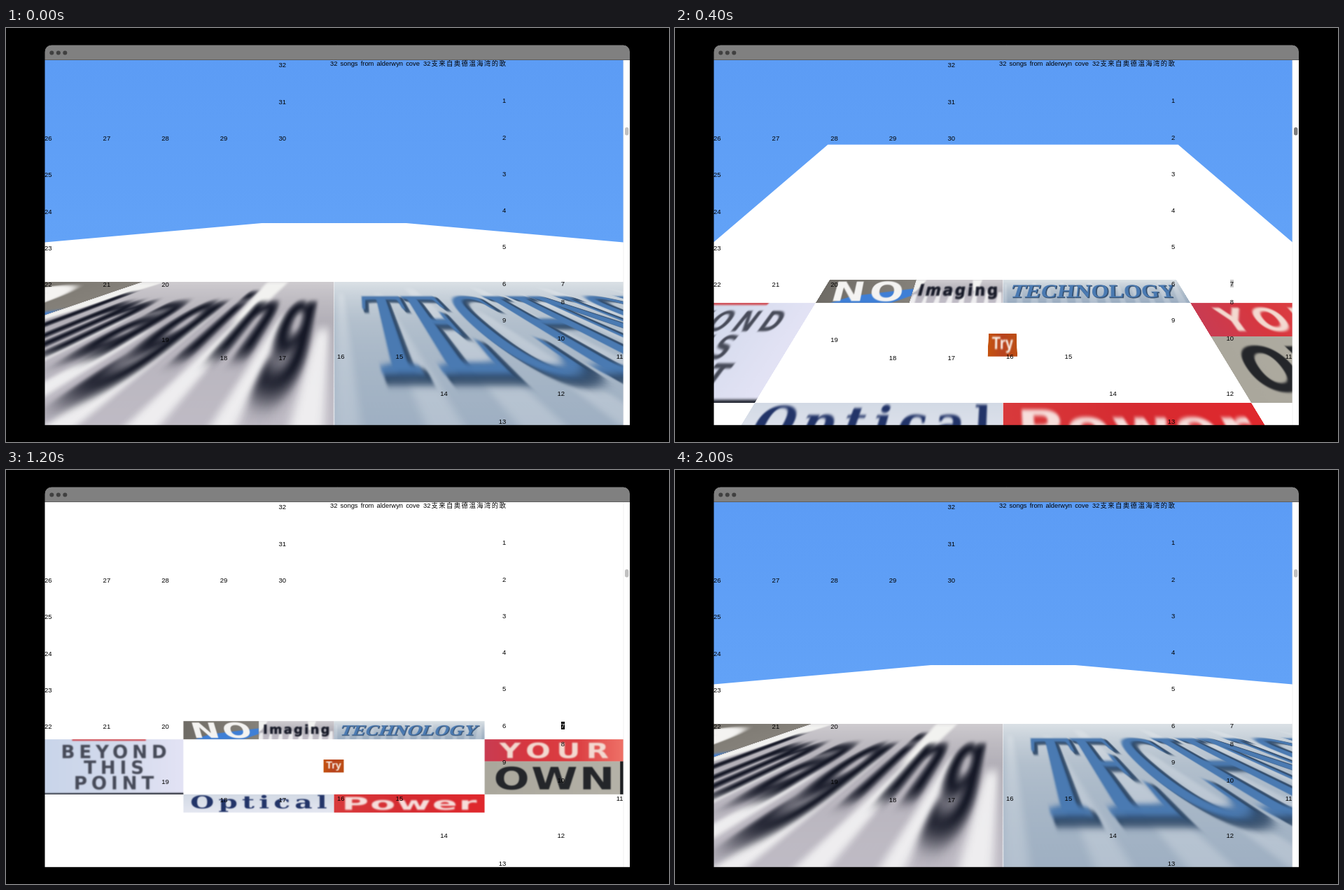
Animation of 947 by 592 pixels, one loop 2.2 s. Source, as an HTML page with a canvas:

```html
<!DOCTYPE html>
<html lang="en">
<head>
<meta charset="utf-8">
<title>Tilting page of signs</title>
<style>
  html, body { margin: 0; width: 100%; height: 100%; overflow: hidden; background: #000; }
  canvas { display: block; }
</style>
</head>
<body>
<canvas id="stage" width="947" height="592"></canvas>
<script>
const ctx = document.getElementById('stage').getContext('2d');
const SANS = '"Liberation Sans", sans-serif';
const HEAVY = '"DejaVu Sans", sans-serif';
const SERIF = '"Liberation Serif", serif';
const SLAB = '"DejaVu Serif", serif';

const view = { x: 55, y: 46, w: 827, h: 522 };
const right = view.x + view.w;
const mid = { x: view.x + view.w / 2, y: 306.5 };
const cell = { w: 83.6, h: 52.3 };   // a tenth of the window

const STEP = 200;
const STEPS = 11;
const tilts = [65, 40.1, 27.6, 0];

// Signs sit on half rows of the grid, in two middle columns with a wing on each side.
const unit = cell.h / 2;
const row = n => 359 + n * unit;
const colW = 215;
const inner = mid.x - colW;
const outer = mid.x + colW;
const wing = inner - view.x;

// The flat strip of signs, painted once at a higher resolution.
const strip = { top: row(0) - 1, h: 5 * unit + 3, k: 5 };
const sheet = document.createElement('canvas');
sheet.width = view.w * strip.k;
sheet.height = strip.h * strip.k;
const art = sheet.getContext('2d');
art.scale(strip.k, strip.k);
art.translate(-view.x, -strip.top);
art.textAlign = 'center';

let seed = 7;
const random = () => (seed = seed * 16807 % 2147483647) / 2147483647;

const soften = px => { art.filter = `blur(${px * strip.k}px)`; };

function shape(color, ...pts) {
  art.fillStyle = color;
  art.beginPath();
  for (let i = 0; i < pts.length; i += 2) art.lineTo(pts[i], pts[i + 1]);
  art.fill();
}

// Text centred by its ink on (x, y).
function letters(text, x, y, { size, ink, face = HEAVY, gap = 0, wide = 1, lean = 0, bold = 0 }) {
  art.save();
  art.transform(wide, 0, -lean, 1, x, y);
  art.font = `bold ${size}px ${face}`;
  art.letterSpacing = gap + 'px';
  art.fillStyle = art.strokeStyle = ink;
  art.lineWidth = bold;
  const box = art.measureText(text);
  const base = (box.actualBoundingBoxAscent - box.actualBoundingBoxDescent) / 2;
  art.fillText(text, gap / 2, base);
  if (bold) art.strokeText(text, gap / 2, base);
  art.restore();
}

// A blurred photo of lettering: a gradient, optional marks, then evenly spaced lines of text.
function sign(x, y, w, h, { colors, down, text, blur = 0.7, marks, shade, ...style }) {
  art.save();
  art.beginPath();
  art.rect(x, y, w, h);
  art.clip();
  const back = art.createLinearGradient(x, y, down ? x : x + w, down ? y + h : y);
  colors.forEach((c, i) => back.addColorStop(i / (colors.length - 1), c));
  art.fillStyle = back;
  art.fillRect(x, y, w, h);
  if (marks) marks(x, y, w, h);
  soften(blur);
  const lines = text.split(' ');
  lines.forEach((line, i) => {
    const cx = x + w / 2;
    const cy = y + h / 2 + (i - (lines.length - 1) / 2) * 22.3;
    if (shade) letters(line, cx + 0.7, cy + 0.5, { ...style, ink: shade, bold: 0.5 });
    letters(line, cx, cy, style);
  });
  art.restore();
}

function streaks(x, y, w, h, gap, color, reach) {
  soften(0.9);
  for (let s = x + 2; s < x + w; s += gap) {
    const tip = y + h * (1 - reach * (0.6 + 0.4 * random()));
    const half = gap * (0.15 + 0.15 * random());
    shape(color, s - half, y + h + 2, s, tip, s + half, tip, s + half, y + h + 2);
  }
}

function paintSigns() {
  sign(inner, row(0), colW / 2, unit, {
    colors: ['#6f6c66', '#7b7770', '#85817a'], text: 'NO', ink: '#f4f3f1',
    size: 30, wide: 1.6, gap: 3, lean: -0.3, blur: 0.5,
    marks(x, y, w, h) {
      soften(0.5);
      shape('#3f7fd6', x + w * 0.15, y + h, x + w * 0.35, y + h * 0.72,
        x + w, y + h * 0.4, x + w, y + h * 0.7, x + w * 0.8, y + h);
    },
  });
  sign(inner + colW / 2, row(0), colW / 2, unit, {
    colors: ['#cfccd0', '#b3b0b8', '#c2bec8'], down: true, text: 'Imaging', ink: '#151826',
    size: 17.5, gap: 2.5, bold: 0.5, blur: 0.75,
    marks(x, y, w, h) {
      streaks(x, y, w, h, 14.3, '#fbfbfbcc', 0.6);
      shape('#f2f2f0', x, y, x + 13, y, x + 4, y + h / 2, x, y + h * 0.6);
      shape('#f2f2f0', x + 70, y, x + 82, y, x + 77, y + h / 2, x + 72, y + h / 2);
    },
  });
  sign(mid.x, row(0), colW, unit, {
    colors: ['#dbe1e6', '#b3c0cd', '#9aacc0'], down: true, text: 'TECHNOLOGY',
    ink: '#4a7ab2', shade: '#2b4564', face: SERIF, size: 21, wide: 1.28, lean: 0.38, blur: 0.35,
    marks: (x, y, w, h) => streaks(x, y, w, h, 17, '#ffffff38', 0.9),
  });
  sign(view.x, row(1), wing, 3 * unit, {
    colors: ['#c9d5ea', '#d3daec', '#e3e3f5'], text: 'BEYOND THIS POINT', ink: '#474b59',
    size: 26, gap: 6, blur: 0.9,
    marks(x, y, w, h) {
      soften(0.9);
      shape('#cf4a52', x + w * 0.2, y - 2, x + w * 0.73, y - 2, x + w * 0.73, y + 2, x + w * 0.2, y + 2);
      shape('#20242f', x - 5, y + h - 1.5, x + w + 5, y + h - 2, x + w + 5, y + h + 4, x - 5, y + h + 4);
    },
  });
  sign(outer, row(1), wing, 1.2 * unit, {
    colors: ['#c93c52', '#d8373f', '#dc4043', '#ef7268'], text: 'YOUR', ink: '#f3d9d0',
    size: 30, wide: 1.4, gap: 6, blur: 1,
  });
  sign(outer, row(2.2), wing, 1.8 * unit, {
    colors: ['#aaa79c', '#b5b2a8'], text: 'OWN', ink: '#24262a', size: 44, wide: 1.36, gap: 2,
    marks: (x, y, w, h) => shape('#1d1f22', x + w - 5, y, x + w, y, x + w, y + h, x + w - 5, y + h),
  });
  sign(inner, row(4), colW, unit, {
    colors: ['#d3dae5', '#e4e7f1'], down: true, text: 'Optical', ink: '#223468',
    face: SLAB, size: 25, wide: 1.56, gap: 4,
  });
  sign(mid.x, row(4), colW, unit, {
    colors: ['#d93a3c', '#d62b31', '#e0282d'], text: 'Power', ink: '#f6dedb',
    size: 25, wide: 2.1, gap: 1, blur: 1.1,
  });
  sign(mid.x - 15, 414, 29, 18.5, {
    colors: ['#c5530f', '#b8431f', '#bd4f14'], text: 'Try', ink: '#fbf3ec',
    face: SANS, size: 14.5, blur: 0.6,
  });
}

// Tilt about the horizontal middle line; the perspective grows together with the tilt.
function drawPlane(tilt) {
  const a = tilt * Math.PI / 180;
  const c = Math.cos(a);
  const depth = Math.sin(a) * tilt / 5100;
  const zoom = d => 1 / (1 - depth * d);
  const up = view.y - mid.y;
  const corner = (side, d) => ctx.lineTo(mid.x + side * view.w / 2 * zoom(d), mid.y + d * c * zoom(d));

  ctx.fillStyle = '#fff';
  ctx.beginPath();
  corner(-1, up);
  corner(-1, 0);
  ctx.lineTo(view.x, 600);
  ctx.lineTo(right, 600);
  corner(1, 0);
  corner(1, up);
  ctx.fill();

  if (!tilt) {
    ctx.imageSmoothingQuality = 'high';
    ctx.drawImage(sheet, view.x, strip.top, view.w, strip.h);
    return;
  }
  ctx.imageSmoothingQuality = 'low';
  const flat = y => (y - mid.y) / (c + depth * (y - mid.y));
  for (let y = 340; y < view.y + view.h; y++) {
    const d = flat(y + 0.5);
    const line = (mid.y + d - strip.top) * strip.k;
    if (line < 0 || line >= sheet.height) continue;
    const tall = Math.max(1, (flat(y + 1) - flat(y)) * strip.k);
    const top = Math.min(Math.max(0, line - tall / 2), sheet.height - tall);
    const w = view.w * zoom(d);
    ctx.drawImage(sheet, 0, top, sheet.width, tall, mid.x - w / 2, y, w, 1);
  }
}

// Links wander over the grid: l, r = one column; u, d = half a row.
const walk = 'dd dd dd dd dd dd r d ld rd rd ldd ldd luu luu l l l lu uuu l l uu uu uu uu r r r r uu uu';

function drawLinks(level) {
  ctx.font = `9.5px ${SANS}`;
  let col = 8, line = 0;
  walk.split(' ').forEach((moves, i) => {
    for (const m of moves) {
      col += (m === 'r') - (m === 'l');
      line += ((m === 'd') - (m === 'u')) / 2;
    }
    const n = i + 1;
    const fromRight = n < 15;
    const x = fromRight ? right - (10 - col) * cell.w - 0.4 : view.x + col * cell.w;
    const y = Math.min(563, (n > 16 ? 53 : 51.6) + line * cell.h);
    const hovered = n === 7 && level > 1;
    if (hovered) {
      ctx.fillStyle = level === 3 ? '#000' : '#c8c8c8';
      ctx.fillRect(x - 5, y - 5.5, 5, 11);
    }
    ctx.textAlign = fromRight ? 'right' : 'left';
    ctx.fillStyle = hovered && level === 3 ? '#fff' : '#000';
    ctx.fillText(n, x, y + 3.3);
  });
}

function drawTitle() {
  const base = 54.4;
  ctx.textAlign = 'left';
  ctx.fillStyle = '#000';
  ctx.font = `9.4px ${SANS}`;
  ctx.wordSpacing = '1.5px';
  ctx.fillText('32 songs from alderwyn cove', 463, base);
  ctx.fillText('32', 596, base);
  ctx.wordSpacing = '0px';
  ctx.font = '9.4px "Noto Sans CJK SC", "Noto Sans CJK", sans-serif';
  ctx.letterSpacing = '1.4px';
  ctx.fillText('支来自奥德温海湾的歌', 607.5, base);
  ctx.letterSpacing = '0px';
}

function drawFrame(level) {
  const edge = 891.5;
  ctx.fillStyle = '#808080';
  ctx.beginPath();
  ctx.roundRect(view.x, 24, edge - view.x, 22, [10, 10, 0, 0]);
  ctx.fill();
  ctx.fillStyle = '#5e5e5e';
  ctx.fillRect(view.x, 45, edge - view.x, 1);
  ctx.fillStyle = '#404040';
  for (let i = 0; i < 3; i++) {
    ctx.beginPath();
    ctx.arc(65.3 + i * 9.5, 35.5, 3, 0, 7);
    ctx.fill();
  }

  ctx.fillStyle = '#fff';
  ctx.fillRect(right, view.y, edge - right, view.h);
  ctx.fillStyle = '#ededed';
  ctx.fillRect(right - 0.4, view.y, 0.8, view.h);
  ctx.fillStyle = level % 3 ? '#7d7d7d' : '#c1c1c1';
  ctx.beginPath();
  ctx.roundRect(884, 142, 5.5, 11.5, 2.7);
  ctx.fill();

  ctx.strokeStyle = '#000';
  ctx.beginPath();
  ctx.roundRect(view.x, 24, edge - view.x, 544.3, [10, 10, 0, 0]);
  ctx.stroke();
}

function draw(level) {
  ctx.fillStyle = '#000';
  ctx.fillRect(0, 0, 947, 592);
  ctx.save();
  ctx.beginPath();
  ctx.rect(view.x, view.y, view.w, view.h);
  ctx.clip();
  const sky = ctx.createLinearGradient(0, view.y, 0, mid.y);
  sky.addColorStop(0, '#5c9cf5');
  sky.addColorStop(1, '#62a2f7');
  ctx.fillStyle = sky;
  ctx.fillRect(view.x, view.y, view.w, view.h);
  drawPlane(tilts[level]);
  drawTitle();
  drawLinks(level);
  ctx.restore();
  drawFrame(level);
}

paintSigns();
const start = performance.now();
let shown = -1;

// The page lies flat in the middle of the loop and tips back up at both ends.
function tick() {
  const step = Math.floor((performance.now() - start) / STEP) % STEPS;
  const level = Math.min(step, STEPS - 1 - step, 3);
  if (level !== shown) draw(shown = level);
  requestAnimationFrame(tick);
}
tick();
</script>
</body>
</html>
```
